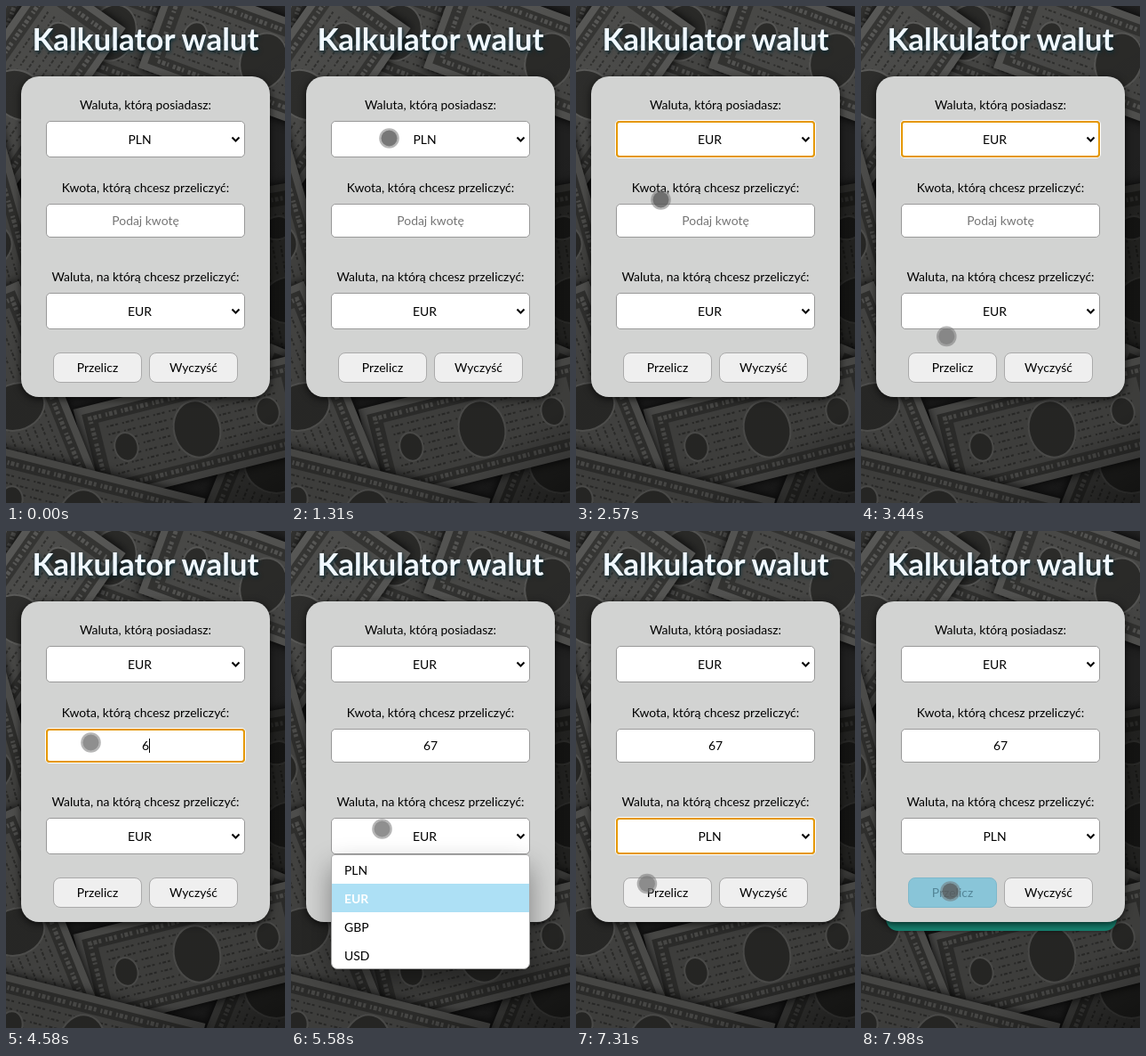
Animation, 314 px wide and 558 px high, one loop 8000 ms. Source, as an HTML page with a canvas:

```html
<!DOCTYPE html>
<html lang="pl">
<head>
<meta charset="utf-8">
<title>Kalkulator walut</title>
<style>
html, body { margin: 0; width: 100%; height: 100%; overflow: hidden; background: #222; }
body { position: relative; font: 13.93px Lato, sans-serif; color: #000; }
body *, canvas { position: absolute; box-sizing: border-box; }
canvas { left: 0; top: 0; }
h1 { left: 0; top: 15px; width: 314px; margin: 0; text-align: center; white-space: nowrap;
  font: bold 35px/42px Lato, sans-serif; color: aliceblue; text-shadow: 1px 2px 4px #0b2a33; }
#panel { left: 28px; top: 400px; width: 260px; border-radius: 0 0 14px 14px;
  background: #157f6d; box-shadow: 0 0 4px #0008; }
#card { left: 17px; top: 79px; width: 280px; height: 360px; border-radius: 20px;
  background: #d2d3d2; box-shadow: 0 2px 8px #000b; }
.label { left: 17px; width: 280px; line-height: 20px; text-align: center; }
.field { left: 45px; width: 224px; border: 1px solid #999; border-radius: 5px;
  background: #fff; text-align: center; }
.select { height: 41px; line-height: 39px; padding-right: 13px; }
.select svg { right: 4px; top: 16px; }
#amount { top: 222px; height: 38px; line-height: 36px; }
.field::after { content: ""; position: absolute; inset: -1px; border-radius: 4px; }
.focus::after { border: 2px solid #e59700; box-shadow: 0 0 0 1px #fff; }
.hint { color: #757575; }
#caret { top: 233px; width: 1px; height: 16px; background: #000; }
.button { top: 389px; width: 100px; height: 34px; border: 1px solid #aaa; border-radius: 8px;
  background: #efefef; line-height: 32px; text-align: center; }
.list { left: 45px; width: 224px; height: 129px; border: 1px solid #aaa; border-radius: 4px 4px 7px 7px;
  background: #fff; overflow: hidden; box-shadow: 0 14px 30px #0006; }
.list div { left: 0; width: 100%; height: 32px; padding-left: 14px; line-height: 33px; }
.list .on { background: #ade0f5; color: #fff; font-weight: bold; }
[hidden] { display: none; }
</style>
</head>
<body>
<canvas id="back" width="314" height="558"></canvas>
<h1>Kalkulator walut</h1>
<div id="panel"></div>
<div id="card"></div>
<div class="label" style="top:101px">Waluta, którą posiadasz:</div>
<div class="field select" id="from" style="top:129px"></div>
<div class="label" style="top:194px">Kwota, którą chcesz przeliczyć:</div>
<div class="field" id="amount"></div>
<div id="caret"></div>
<div class="label" style="top:294px">Waluta, na którą chcesz przeliczyć:</div>
<div class="field select" id="to" style="top:322px"></div>
<div class="button" id="submit" style="left:53px">Przelicz</div>
<div class="button" style="left:161px">Wyczyść</div>
<div class="list" id="fromList" style="top:170px"></div>
<div class="list" id="toList" style="top:363px"></div>
<canvas id="front" width="314" height="558"></canvas>
<script>
const LOOP = 8000;
const CODES = ['PLN', 'EUR', 'GBP', 'USD'];
const CHEVRON = '<svg width="11" height="8"><path d="M1.5 1.5l4 4 4-4" fill="none" stroke="#000" stroke-width="2"/></svg>';
const $ = id => document.getElementById(id);
const within = (t, a, b) => t >= a && t < b;

for (const id of ['fromList', 'toList'])
  $(id).innerHTML = CODES.map((c, i) => `<div style="top:${i * 32}px">${c}</div>`).join('');

// Backdrop: scattered banknotes as plain shapes
function note(g, x, y, angle, tone) {
  const shade = k => { const v = Math.round(tone * k); return `rgb(${v},${v},${v - 2})`; };
  g.save();
  g.translate(x, y);
  g.rotate(angle * Math.PI / 180);
  g.shadowColor = '#000';
  g.shadowBlur = 12;
  g.fillStyle = shade(1.15);
  g.fillRect(-130, -55, 260, 110);
  g.shadowBlur = 0;
  g.fillStyle = shade(0.7);
  g.fillRect(-122, -47, 244, 94);
  g.fillStyle = shade(1);
  g.fillRect(-106, -34, 212, 68);
  g.lineWidth = 5;
  g.setLineDash([2, 2, 4, 2, 3, 5]);
  g.strokeStyle = shade(1.15);
  g.strokeRect(-114, -40.5, 228, 81);
  g.lineWidth = 2;
  g.strokeStyle = shade(0.65);
  for (let i = 0; i < 7; i++) {
    g.beginPath();
    g.moveTo(-98, -27 + i * 9);
    g.lineTo(98, -27 + i * 9);
    g.stroke();
  }
  g.setLineDash([]);
  g.fillStyle = shade(0.6);
  for (const [cx, rx, ry] of [[0, 26, 32], [-82, 13, 16], [82, 13, 16]]) {
    g.beginPath();
    g.ellipse(cx, 0, rx, ry, 0, 0, 7);
    g.fill();
    g.strokeStyle = shade(1.2);
    g.stroke();
  }
  g.restore();
}

function drawBack() {
  const g = $('back').getContext('2d');
  g.fillStyle = '#262626';
  g.fillRect(0, 0, 314, 558);
  const notes = [
    [320, 330, 80, 40], [120, 30, 20, 76], [15, 100, -55, 82], [290, 62, 20, 80],
    [-25, 270, 74, 74], [300, 520, -68, 62], [215, 475, -14, 76],
    [12, 450, 68, 80], [85, 575, 14, 76]
  ];
  for (const n of notes) note(g, ...n);
  const dim = g.createLinearGradient(0, 0, 314, 558);
  dim.addColorStop(0, '#0001');
  dim.addColorStop(0.6, '#0003');
  dim.addColorStop(0.85, '#0003');
  dim.addColorStop(1, '#0008');
  g.fillStyle = dim;
  g.fillRect(0, 0, 314, 558);
}

// Pointer moves: start, end, steps, then start, bend and end points
const MOVES = [
  [650, 1120, 8, 282, 474, 190, 250, 110, 148],
  [1770, 2180, 7, 110, 148, 108, 190, 95, 217],
  [2850, 3640, 11, 95, 217, 97, 577, 95, 237],
  [4970, 5240, 5, 95, 237, 82, 290, 102, 334],
  [5840, 6380, 9, 102, 334, 80, 448, 67, 384],
  [7120, 7510, 7, 67, 384, 80, 400, 100, 404]
];
const PRESSES = [[1310, 1390], [2570, 2850], [3640, 3810], [6910, 7120], [7840, LOOP]];
const CLICKS = [[2500, 2570], [6840, 6910]];
const ARROW = new Path2D('M0 0V15.5L3.6 12.2L6 18L8.3 17L5.9 11.3H10.8Z');

function pointerAt(t) {
  const move = MOVES.filter(m => t >= m[0]).pop();
  if (!move) return null;
  const [start, end, n, x0, y0, x1, y1, x2, y2] = move;
  const k = Math.min(n - 1, Math.floor((t - start) / (end - start) * (n - 1) + 1e-6));
  const p = start === 650 ? k / (n - 1) : (k + 1) / n;
  const bend = (a, b, c) => (1 - p) ** 2 * a + 2 * p * (1 - p) * b + p * p * c;
  return [bend(x0, x1, x2), bend(y0, y1, y2)];
}

function disc(g, x, y, r, fill) {
  g.fillStyle = fill;
  g.beginPath();
  g.arc(x, y, r, 0, 7);
  g.fill();
}

function drawPointer(t, overList) {
  const g = $('front').getContext('2d');
  g.clearRect(0, 0, 314, 558);
  const at = pointerAt(t);
  if (!at) return;
  const [x, y] = at;
  const hit = spans => spans.some(([a, b]) => within(t, a, b));
  if (!overList(y)) {
    disc(g, x + 0.5, y + 0.5, 11.3, 'rgba(110,110,110,.5)');
    disc(g, x + 0.5, y + 0.5, 9, hit(PRESSES) ? 'rgba(81,81,81,.62)' : 'rgba(120,120,120,.62)');
    return;
  }
  if (hit(CLICKS)) disc(g, x, y - 0.5, 14.5, 'rgba(215,228,60,.72)');
  g.save();
  g.translate(x + 0.5, y + 0.5);
  g.fillStyle = '#fff';
  g.strokeStyle = '#000';
  g.fill(ARROW);
  g.stroke(ARROW);
  g.restore();
}

function setSelect(id, code, focused) {
  $(id).innerHTML = code + CHEVRON;
  $(id).classList.toggle('focus', focused);
}

function setList(id, open, active) {
  $(id).hidden = !open;
  [...$(id).children].forEach((row, i) => row.classList.toggle('on', i === active));
}

function mix(a, b, p) {
  return `rgb(${a.map((v, i) => Math.round(v + (b[i] - v) * p))})`;
}

function render(t) {
  const fromOpen = within(t, 1390, 2570), toOpen = within(t, 5580, 6910);
  setSelect('from', t < 2570 ? 'PLN' : 'EUR', within(t, 2570, 3640));
  setSelect('to', t < 6910 ? 'EUR' : 'PLN', within(t, 6910, 7840));
  setList('fromList', fromOpen, t < 2500 ? 0 : 1);
  setList('toList', toOpen, t < 6840 ? 1 : 0);

  const typed = t < 4580 ? '' : t < 4700 ? '6' : '67';
  $('amount').textContent = typed || 'Podaj kwotę';
  $('amount').className = 'field' + (typed ? '' : ' hint') + (within(t, 3640, 5580) ? ' focus' : '');
  $('caret').hidden = !(within(t, 3640, 4180) || within(t, 4580, 5200));
  $('caret').style.left = [157, 161, 165][typed.length] + 'px';

  const p = t < 7840 ? 0 : Math.min(1, (Math.floor((t - 7840) / 70) + 1) / 3);
  const button = $('submit').style;
  button.background = mix([239, 239, 239], [137, 197, 216], p);
  button.borderColor = mix([170, 170, 170], [125, 184, 203], p);
  button.color = mix([0, 0, 0], [84, 134, 152], p);
  $('panel').style.height = 30 + 19 * p + 'px';
  $('panel').hidden = !p;

  drawPointer(t, y => fromOpen && y > 171 || toOpen && y > 364);
}

drawBack();
const origin = performance.now();
function tick() {
  render((performance.now() - origin) % LOOP);
  requestAnimationFrame(tick);
}
tick();
</script>
</body>
</html>
```
